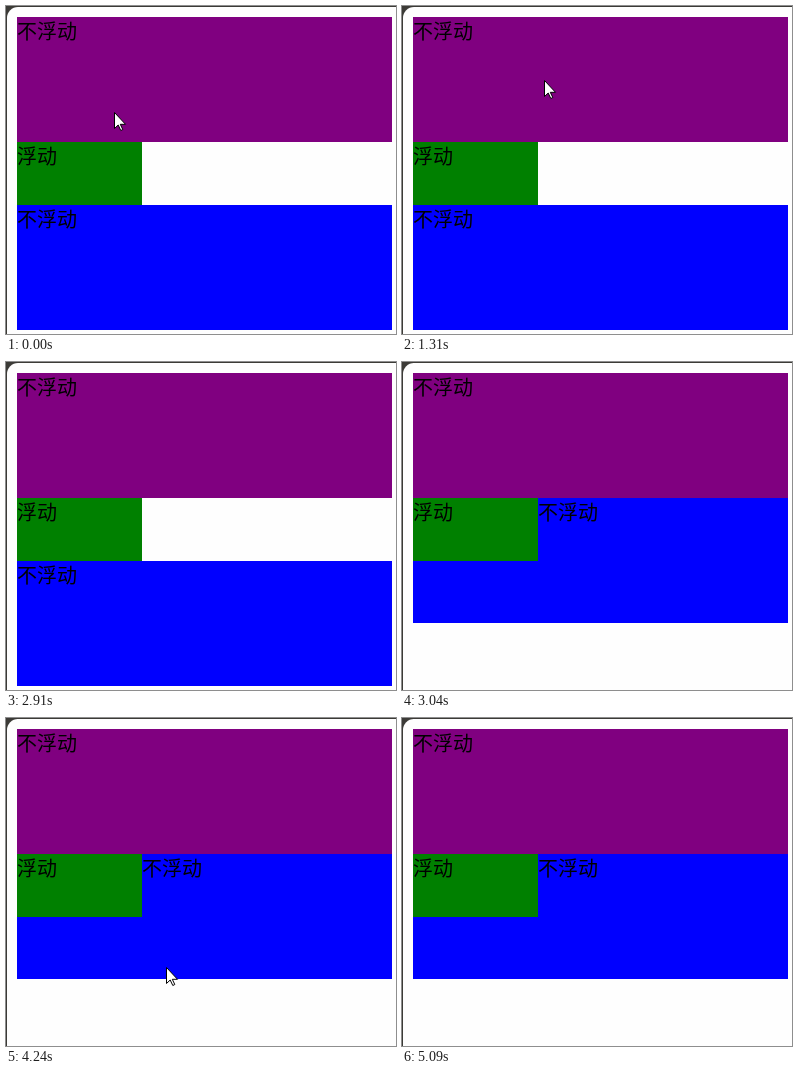
An HTML page for the animation above (5720 ms loop, 390 by 328 pixels).

```html
<!DOCTYPE html>
<html lang="zh">
<meta charset="utf-8">
<style>
  html, body { margin: 0; width: 100%; height: 100%; overflow: hidden; background: #3c3b37; }
  #page {
    position: absolute; inset: 1px 0 0 1px; padding: 10px 4px 0 10px;
    background: #fefefe; border-radius: 11px 0 0 0;
    font: 350 20px/28px "Noto Sans CJK SC", "Noto Sans CJK", sans-serif; color: #000;
  }
  #page div { height: 125px; }
  #top { background: purple; }
  #page #side { float: left; width: 125px; height: 63px; background: green; }
  #low { background: blue; }
  svg { position: absolute; left: -1px; top: -1px; width: 12px; height: 19px; overflow: visible; }
  path { stroke: #000; }
  #arrow { fill: #fff; }
  #beam { fill: none; }
</style>
<body>
<div id="page">
  <div id="top">不浮动</div>
  <div id="side">浮动</div>
  <div id="low">不浮动</div>
</div>
<svg>
  <path id="arrow" d="M.5 .5v16l3.7-3.5 2.6 5.5 2-1-2.5-5.2h5.2z"/>
  <path id="beam" d="M-3 -7.5h3M1 -7.5h3M.5 -7v14M-3 7.5h3M1 7.5h3"/>
</svg>
<script>
const LOOP = 5720, SWITCH = 3040;
const $ = id => document.getElementById(id);
const easeOut = p => p * (2 - p);

// start, end, x, y: the pointer glides to each spot and rests there
const moves = [
  [20, 510, 141, 80], [610, 650, 143, 77], [1290, 1930, 144, 39],
  [2030, 2370, 142, -20], [3340, 3800, 135, 71], [3800, 3860, 153, 142],
  [3940, 4490, 163, 278], [4570, 5080, 182, 330]
];

function pointer(t) {
  let x = 109, y = 107;
  for (const [start, end, toX, toY] of moves) {
    if (t < start) break;
    const p = easeOut(Math.min(1, (t - start) / (end - start)));
    x += (toX - x) * p;
    y += (toY - y) * p;
  }
  return [Math.round(x), Math.round(y)];
}

function draw(now) {
  const t = now % LOOP, [x, y] = pointer(t);
  const overText = t > SWITCH && x >= 136 && x < 196 && y >= 136 && y < 164;
  $("low").style.clear = t < SWITCH ? "both" : "none";
  document.querySelector("svg").style.transform = `translate(${x}px, ${y}px)`;
  $("arrow").style.display = overText ? "none" : "";
  $("beam").style.display = overText ? "" : "none";
  requestAnimationFrame(draw);
}
draw(performance.now());
</script>
</body>
</html>
```
